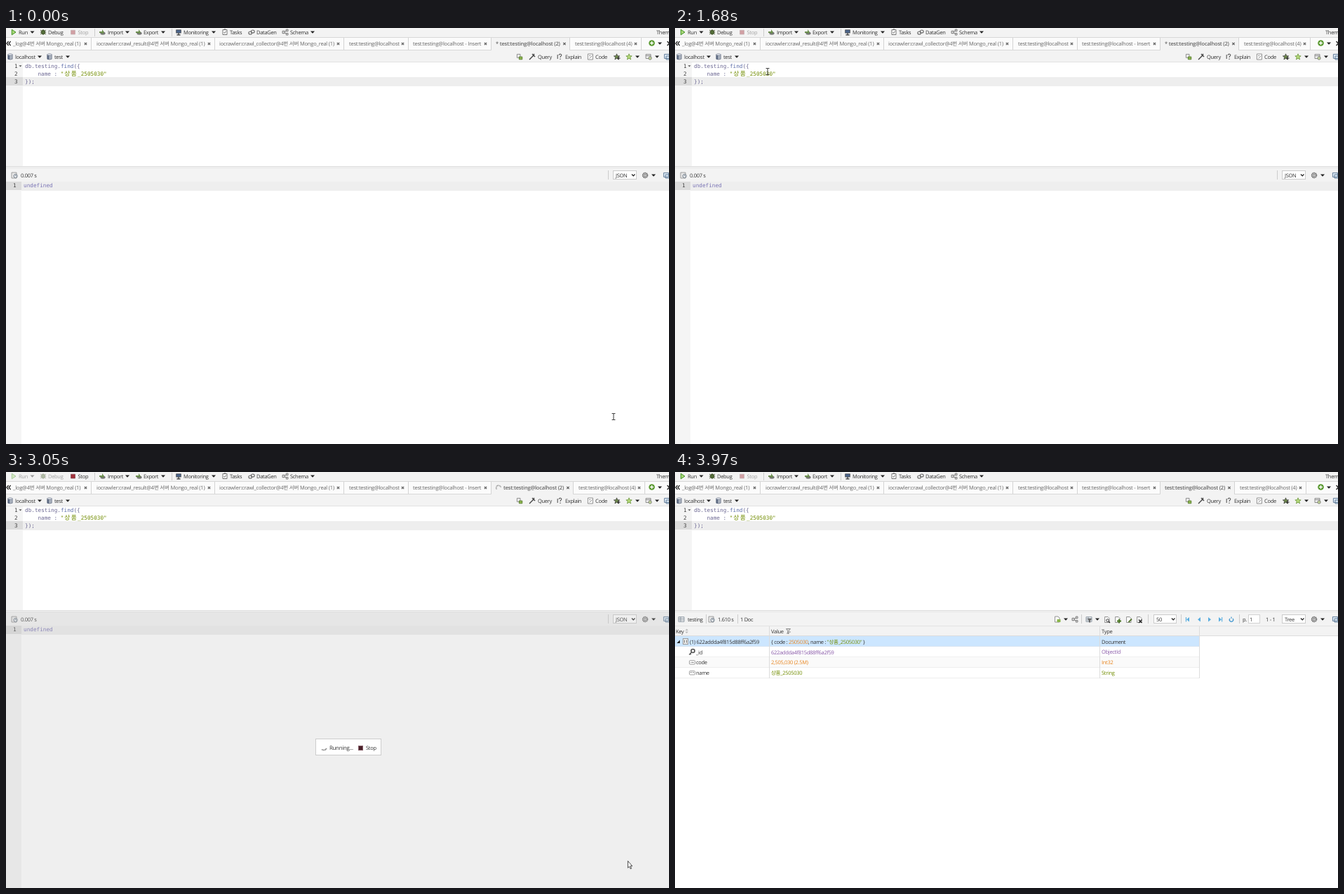
An HTML page that plays this animation: 945x593 px, repeating every 4760 ms.

```html
<!DOCTYPE html>
<html lang="ko">
<head>
<meta charset="utf-8">
<title>Query run</title>
<style>
html, body { margin: 0; width: 100%; height: 100%; overflow: hidden; background: #fff; }
svg { display: block; }
text {
  font: 7.5px "Open Sans", "Noto Sans CJK KR", "Noto Sans CJK", sans-serif;
  letter-spacing: -.3px;
  fill: #333;
  white-space: pre;
  text-rendering: geometricPrecision;
}
.tab { letter-spacing: -.24px; fill: #666; }
.long { letter-spacing: -.2px; fill: #666; }
.active { font-weight: 600; letter-spacing: -.2px; fill: #666; }
.big { font-size: 7.9px; }
.mono { font: 7.7px "DejaVu Sans Mono", monospace; letter-spacing: 0; fill: #6c6893; }
.num { fill: #444; }
.hangul { font: 8.7px "Noto Sans CJK KR", "Noto Sans CJK", sans-serif; letter-spacing: 1.4px; }
.str { fill: #718c00; }
.fn { fill: #5a6aa8; }
.val { fill: #7a74b5; }
.oid { fill: #8959a8; }
.int { fill: #e8851f; }
</style>
</head>
<body>
<svg id="stage" width="945" height="593">
  <defs>
    <path id="caret" d="M-3-1.6h6l-3 3.4z" fill="#222"/>
    <path id="close" d="M-1.7-1.7l3.4 3.4m0-3.4l-3.4 3.4" stroke="#555" stroke-width="1.1"/>
    <path id="play" d="M-2.7-3.8L3 0l-5.7 3.8z" fill="#a9d878" stroke="#3f8f22"/>
    <g id="bug" stroke="#3c4a25" fill="#55703a" stroke-width=".9">
      <path d="M-4-3l8 6m0-6l-8 6M-4.2 0h8.4"/><ellipse rx="2.4" ry="3.2"/>
    </g>
    <path id="halt" d="M-3-2.8h6v5.8h-6z" fill="#a3303a" stroke="#7d4a4f" stroke-width=".7"/>
    <g id="transfer">
      <ellipse cx="1" cy="1.6" rx="3.6" ry="2.2" fill="#777"/>
      <path d="M-4-1h4v-3l3 4-3 3V1h-4z" fill="#6b8f4e"/>
    </g>
    <g id="screen">
      <path d="M-3.4-3.3h6.8v4.4h-6.8z" fill="#4a638a" stroke="#555" stroke-width=".8"/><path d="M-2.6 3.8h5.2M0 1v3" stroke="#333" stroke-width="1.2"/>
    </g>
    <path id="board" d="M-3-3.5h6v7h-6zM-1-4.2h2M-1.4 0l1 1.4L1.8-1.6" fill="#fff" stroke="#555" stroke-width=".8"/>
    <g id="links" fill="#ddd" stroke="#666" stroke-width=".8">
      <path d="M-2 0L2.6-2.6M-2 0L2.6 2.6"/><path d="M-4-1.7h3.2v3.4H-4zM1.3-4H4v2.6H1.3zM1.3 1.4H4V4H1.3z"/>
    </g>
    <g id="chain" fill="none" stroke="#666" stroke-width="1.1">
      <ellipse cx="-1.8" cy="1" rx="2.4" ry="2"/><ellipse cx="1.8" cy="-1" rx="2.4" ry="2"/>
    </g>
    <g id="base">
      <path d="M-3.2-3.2v6.4q3.2 1.6 6.4 0v-6.4z" fill="#aab2be" stroke="#667083" stroke-width=".7"/>
      <path d="M-3.2-3v6.2q1.2.8 2.4.9V-2.4z" fill="#5d6a82"/>
      <ellipse cy="-3.1" rx="3.2" ry="1.2" fill="#e6eaf0" stroke="#667083" stroke-width=".6"/>
    </g>
    <g id="timer">
      <path d="M-4-4h7v8h-7z" fill="#e9e9e9" stroke="#888" stroke-width=".8"/><circle cx="1.6" cy="1" r="2.5" fill="#fff" stroke="#456" stroke-width=".8"/><path d="M1.6-.6V1H3" fill="none" stroke="#456" stroke-width=".7"/>
    </g>
    <g id="lock">
      <path d="M-3.6-3.6h4.6v5h-4.6z" fill="#eee" stroke="#777" stroke-width=".8"/><path d="M-.6 0h4.4v3.8H-.6z" fill="#8bb54c" stroke="#54762a" stroke-width=".8"/>
    </g>
    <path id="wand" d="M-4 4L2-2M0-4l4 4M3-4L1-1" stroke="#444" stroke-width="1.4"/>
    <path id="ask" d="M-1.8-2.2q.4-2 2.2-1.6t1.2 2.2Q0-.6 0 1M0 2.6v1.4M-3.8-3v6" fill="none" stroke="#555" stroke-width="1.1"/>
    <path id="code" d="M-3.6-4h7v8h-7zM-1.5 2.5l4-4M-2-1.6h2.4" fill="#fff" stroke="#777" stroke-width=".8"/>
    <path id="star" d="M0-4.2l1.2 2.9 3 .2-2.4 1.9.8 3.1L0 2.2l-2.6 1.7.8-3.1-2.4-1.9 3-.2z" stroke-width=".7"/>
    <g id="gear" fill="none" stroke="#666">
      <circle r="3.5" stroke-width="1.4" stroke-dasharray="1.7 .5"/><circle r="2" fill="#ccc" stroke-width=".8"/>
    </g>
    <path id="window" d="M-3.6-3.6h7v6h-7zM-1-1h6v5h-6z" fill="#dbe8f4" stroke="#5b7795" stroke-width=".9"/>
    <path id="sheet" d="M-4-3.4h8v6.8h-8zM-4-1.2h8M-4 1h8M-1-3.4v6.8" fill="#f8f8f8" stroke="#7a8794" stroke-width=".8"/>
    <path id="page" d="M-3.4-4h4.4l2 2v6h-6.4z" fill="#fff" stroke="#777" stroke-width=".8"/>
    <path id="ibeam" d="M-2.4-4.5h2q.4 0 .4.6.0-.6.4-.6h2M0-4.2v8.4M-2.4 4.5h2q.4 0 .4-.6 0 .6.4.6h2" fill="none" stroke="#222" stroke-width=".9"/>
    <path id="arrow" d="M.4.5v9.8l2.1-2 1.6 3.4 1.4-.6-1.5-3.4h2.7z" fill="#fff" stroke="#222" stroke-width=".8"/>
    <path id="hand" d="M-1 .9q1-1.4 2 0v4.3l3.4.9q1.2.3 1 1.7l-.8 4.3q-.3 1.6-1.6 1.6H0q-1 0-1.7-1.2L-4 8.6q.6-1.6 2 0l1 .8z" fill="#fff" stroke="#222" stroke-width=".9"/>
  </defs>
</svg>
<script>
const T = 4760;
const stage = document.getElementById('stage');

const use = (id, x, y, extra = '') => `<use href="#${id}" x="${x}" y="${y}" ${extra}/>`;
const text = (x, y, s, cls = '') => `<text x="${x}" y="${y}" class="${cls}">${s}</text>`;
const box = (x, y, w, h, fill, line) =>
  `<rect x="${x}" y="${y}" width="${w}" height="${h}" fill="${fill}" ${line ? `stroke="${line}"` : ''}/>`;
const vline = (x, y, h, fill = '#ccc') => box(x, y, 1, h, fill);
const group = (id, ...parts) => `<g id="${id}">${parts.join('')}</g>`;
const carets = (y, ...xs) => xs.map(x => use('caret', x, y)).join('');
const label = (y, icon, x, s, gap = 7) => use(icon, x, y) + text(x + gap, y + 2.8, s);
const select = (x, w, s) => box(x + .5, 203.5, w, 12, '#fff', '#ccc') + text(x + 4, 212.7, s) +
  `<path d="M${x + w - 6} 208.5l2.2 2.4 2.2-2.4" fill="none" stroke="#222" stroke-width="1.3"/>`;
const tab = (left, right, x, s, cls, on) =>
  box(left, 14, right - left, on ? 18 : 17, on ? '#f3f3f3' : '#fbfbfb') +
  vline(right, 14, 17, '#d4d4d4') + text(x, 24.9, s, cls) + use('close', right - (on ? 7 : 7.5), 22.5);

const query = 'test:testing@localhost';
const endTabs = (id, edge, x, s, extra = '') => group(id,
  tab(692, edge, x, s, 'active', true),
  tab(edge + 1, edge + 102, edge + 8, query + ' (4)', 'tab'), extra);
// An arc centred on its lowest point.
const spinner = (id, x, y, r, sweep, style) => {
  const a = Math.PI / 2 - sweep / 2, b = a + sweep;
  const at = k => `${r * Math.cos(k)} ${r * Math.sin(k)}`;
  return `<g transform="translate(${x} ${y})"><path id="${id}" d="M${at(a)}A${r} ${r} 0 ${sweep > Math.PI ? 1 : 0} 1 ${at(b)}"
    fill="none" ${style}/></g>`;
};
const resultTools = name => select(865, 33, name) + use('gear', 911, 210) + carets(210, 923) + use('window', 941, 210);

const frame = [
  box(0, 0, 945, 49, '#f3f3f3'), box(0, 13, 945, 1, '#d8d8d8'),
  box(0, 14, 945, 17, '#fbfbfb'), box(0, 31, 945, 1, '#d8d8d8'), box(0, 48, 945, 1, '#e2e2e2'),
  vline(126, 1, 11), vline(236, 1, 11),
  label(6, 'transfer', 137, 'Import', 8), label(6, 'transfer', 189, 'Export'),
  label(6, 'screen', 246, 'Monitoring'), label(6, 'board', 312, 'Tasks'),
  label(6, 'chain', 350, 'DataGen'), label(6, 'links', 398, 'Schema'),
  text(927, 8.8, 'Theme'), carets(6, 173, 224, 296, 437),
  tab(0, 121, 10, '_log@4번 서버 Mongo_real (1)', 'long'),
  tab(122, 297, 129, 'iocrawler:crawl_result@4번 서버 Mongo_real (1)', 'long'),
  tab(298, 481, 304, 'iocrawler:crawl_collector@4번 서버 Mongo_real (1)', 'long'),
  tab(482, 573, 489, query, 'tab'), tab(574, 691, 580, query + ' - Insert', 'long'),
  '<path d="M3.6 19l-2.6 3 2.6 3m3-6L4 22l2.6 3" fill="none" stroke="#222" stroke-width="1.2"/>',
  '<circle cx="920.5" cy="21.5" r="4.3" fill="#5b9a32"/><path d="M918 21.5h5M920.5 19v5" stroke="#fff" stroke-width="1.4"/>',
  carets(22, 932), '<path d="M942.5 19l3 3-3 3" fill="none" stroke="#222" stroke-width="1.4"/>',
  label(41, 'base', 6, 'localhost'), label(41, 'base', 62, 'test'),
  use('lock', 732, 41), label(41, 'wand', 750, 'Query', 8), label(41, 'ask', 790, 'Explain'),
  label(41, 'code', 833, 'Code'),
  use('star', 870.5, 41, 'fill="#6f8a4c" stroke="#333"'), '<path d="M871 43h4.6m-2.3-2.3v4.6" stroke="#333" stroke-width="1.1"/>',
  use('star', 888, 41, 'fill="#b5d97a" stroke="#5b8a2a"'),
  '<path d="M912 37.5h7v6h-7zM912 39.5h7" fill="#eee" stroke="#777" stroke-width=".8"/><circle cx="918" cy="43" r="2.2" fill="#c4d69a" stroke="#666" stroke-width=".7"/>',
  use('window', 942, 41), carets(41, 48, 88, 900, 928),
  box(0, 49, 945, 148, '#fff'), box(0, 49, 24, 148, '#f4f4f4'),
  box(24, 70, 921, 13, '#eee'), box(0, 70, 24, 12, '#dcdcdc'),
  [57, 67.6, 78.6].map((y, i) => text(12, y, i + 1, 'mono num')).join(''),
  '<path d="M18.5 53.3h4l-2 2.3z" fill="#555"/>',
  text(27, 57, 'db.testing.<tspan class="fn">find</tspan>({', 'mono'),
  text(45.4, 67.6, 'name : <tspan class="str">"</tspan>', 'mono'),
  text(83.3, 68, '상품', 'hangul str'), text(102, 67.6, '_2505030"', 'mono str'),
  text(27, 78.6, '});', 'mono'),
  box(0, 197, 945, 22, '#f3f3f3'), box(0, 197, 945, 1, '#dcdcdc'), box(0, 199, 945, 1, '#e8e8e8')
];

const idle = group('idle',
  box(0, 219, 945, 374, '#fff'), box(0, 219, 22, 374, '#f5f5f5'),
  box(22, 219, 923, 13, '#eee'), box(0, 219, 22, 12, '#dcdcdc'),
  text(10, 227.4, '1', 'mono num'), text(25, 227.4, 'undefined', 'mono val'),
  label(210, 'timer', 12, '0.007 s', 9), vline(858, 203, 13), resultTools('JSON'));

const busy = group('busy',
  box(0, 199, 945, 394, 'rgba(191,191,191,.25)'),
  box(441.5, 380.5, 93, 23, '#fff', '#ccc'),
  spinner('spin', 453, 392.5, 4, 2, 'stroke="#444" stroke-width="1.2" stroke-dasharray="1.5 .5"'),
  text(461, 395.7, 'Running...', 'big'), box(502.5, 390.5, 6, 6, '#4a2029', '#86606a'), text(513, 396.2, 'Stop'));

const row = (y, fill) => box(0, y, 747, 15, fill) + box(0, y + 14.5, 747, .7, '#e3e3e3');
const badge = (y, s) => `<rect x="20.5" y="${y - 2.7}" width="8" height="5.4" rx="1" fill="#fff" stroke="#888" stroke-width=".8"/>` +
  `<path d="${s}" transform="translate(24.5 ${y})" stroke="#555"/>`;
const types = [['Document', ''], ['ObjectId', 'oid'], ['Int32', 'int'], ['String', 'str']];
const navIcon = (x, dir, bar) => `<path d="M${x + 2 * dir} 207l${-4 * dir} 3.2 ${4 * dir} 3.2z" fill="#5aaee0"/>` +
  (bar ? box(x - 2.6 * dir - .5, 207, 1.1, 6.4, '#5aaee0') : '');
const id = '622addda4f815d88ff6a2f59';

const done = group('done',
  box(0, 219, 945, 374, '#fff'),
  group('wait', box(0, 294, 945, 299, '#f3f3f3')),
  box(0, 219, 945, 15, '#f3f3f3'), box(0, 219, 945, .7, '#ddd'), box(0, 233, 945, 1, '#dcdcdc'),
  row(234, '#cce6ff'), row(249, '#fff'), row(264, '#fafafa'), row(279, '#fff'),
  [134, 605, 747].map(x => vline(x, 220, 74, '#dcdcdc')).join(''),
  text(1, 229.6, 'Key'), '<path d="M14.5 226l2.2-2.5 2.2 2.5zm0 1.5l2.2 2.5 2.2-2.5z" fill="#bbb"/>',
  text(137, 229.6, 'Value'), '<path d="M158.5 223.5h6l-2.4 3v4l-1.4-1v-3zM159 230h3M163 228h2" fill="#ddd" stroke="#777" stroke-width=".8"/>',
  text(608, 229.6, 'Type'),
  '<path d="M7 239.5v4.4H2.6z" fill="#222"/>', box(11.5, 237.5, 7, 8, '#eee', '#999'),
  '<path d="M13.5 239.5v4M16.5 239.5v4" stroke="#777"/>',
  text(21, 244.6, `(1) ${id}`),
  '<circle cx="25.5" cy="255" r="2.5" fill="none" stroke="#555" stroke-width="1.6"/><path d="M23.6 257l-3.4 3.4m1.4-1.4l1.2 1.2" stroke="#555" stroke-width="1.4"/>',
  text(30, 259.6, '_id'), badge(271.4, 'M-2 0h1m1 0h2'), text(30, 274.4, 'code'),
  badge(286.3, 'M-2.5-.6h1.6m1.6 0h1.6'), text(30, 289.2, 'name'),
  text(137, 244.6, '{ code : <tspan class="int">2505030</tspan>, name : <tspan class="str">"상품_2505030"</tspan> }'),
  text(137, 259.6, id, 'oid'), text(137, 274.4, '2,505,030 (2.5M)', 'int'), text(137, 289.2, '상품_2505030', 'str'),
  types.map(([s, cls], i) => text(608, 244.6 + i * 14.87, s, cls)).join(''),
  label(210, 'sheet', 9, 'testing', 9), vline(44, 203, 13), label(210, 'timer', 52, '1.610 s', 9),
  vline(89, 203, 13), text(93, 212.7, '1 Doc'),
  use('page', 545, 210), box(544.5, 210, 5, 4, '#8bb54c'), use('links', 570, 210), vline(579, 203, 13),
  use('sheet', 590, 210), '<path d="M588 209h6l-2 2.4v3h-2v-3z" fill="#666"/>', carets(210, 557, 602),
  [616, 631, 647, 662].map(x => use('page', x, 210.5)).join(''),
  '<circle cx="616.5" cy="211.5" r="1.8" fill="#fff" stroke="#333"/><path d="M618 213l2 2" stroke="#333" stroke-width="1.3"/>',
  '<path d="M630 212.5h6m-3-3v6" stroke="#47751f" stroke-width="1.8"/><path d="M646.5 214l4.5-4.5" stroke="#55762f" stroke-width="1.8"/>',
  '<path d="M661 210.5l4.5 4.5m0-4.5l-4.5 4.5" stroke="#222" stroke-width="1.4"/>',
  vline(674, 203, 13), select(682, 32, '50'), vline(721, 203, 13),
  navIcon(731, 1, true), navIcon(747, 1), navIcon(762, -1), navIcon(777, -1, true),
  '<path d="M791 208.8a2.7 2.7 0 1 0 4 0m-2-2.4v2.4" fill="none" stroke="#3f95cf" stroke-width="1.2"/>',
  vline(804, 203, 13), text(809, 212.7, 'p.'), box(817.5, 203.5, 16, 12, '#fff', '#d2d2d2'),
  text(819, 212.7, '1'), text(842, 212.7, '1 - 1'), resultTools('Tree'));

stage.innerHTML += [
  ...frame,
  group('hover', box(3.5, -1, 39, 13.5, '#eef5fc', '#8592ad'), vline(33, 0, 12, '#8592ad')),
  group('run', use('play', 11, 6), text(18, 8.8, 'Run'), carets(6, 37.5), label(6, 'bug', 53, 'Debug')),
  group('stop', label(6, 'halt', 95.5, 'Stop')),
  endTabs('tabIdle', 803, 698, `* ${query} (2)`),
  endTabs('tabBusy', 808, 709, `${query} (2)`, spinner('tabSpin', 702, 22.5, 3.4, 3.6, 'stroke="#777"')),
  endTabs('tabDone', 797, 698, `${query} (2)`),
  idle, busy, done,
  '<circle id="click" cx="25" cy="5" r="9" fill="#f4ee3c" style="mix-blend-mode:multiply"/>',
  group('cursor', group('beam', use('ibeam', 0, 0)), group('point', use('arrow', 0, 0)), group('finger', use('hand', 0, 0)))
].join('');

// Keyframes are [time in ms, properties, easing to the next one].
const play = (id, frames) => document.getElementById(id).animate(
  frames.map(([t, props, easing = 'step-end']) => ({ offset: t / T, ...props, easing })),
  { duration: T, iterations: Infinity });
const fade = (id, ...keys) => play(id, [...keys, [T, keys.at(-1)[1]]].map(([t, opacity]) => [t, { opacity }]));
const show = (id, from, to) => fade(id, [0, 0], [from, 1], [to, 0]);

const START = 1740, LOCKED = 2010, RESULT = 3410, READY = 3760;
fade('run', [0, 1], [LOCKED, .42], [READY, 1]);
fade('stop', [0, .42], [LOCKED, 1], [READY, .42]);
show('hover', 470, 1680);
show('click', 1480, 1610);
fade('tabIdle', [0, 1], [START, 0]);
show('tabBusy', START, RESULT);
fade('tabDone', [0, 0], [RESULT, 1]);
fade('idle', [0, 1], [RESULT, 0]);
show('busy', START, RESULT);
fade('done', [0, 0], [RESULT, 1]);
show('wait', RESULT, READY);

// One turn takes `period`; the arc points down at `zero`.
const spin = (id, period, zero) => {
  const turn = t => ({ transform: `rotate(${(t - zero) / period * 360}deg)` });
  play(id, [[0, turn(0), 'steps(68)'], [T, turn(T)]]);
};
spin('spin', 1240, 1810);
spin('tabSpin', 2000, 2160);

fade('beam', [0, 1], [270, 0], [1680, 1], [1940, 0]);
fade('point', [0, 0], [1610, 1], [1680, 0], [1940, 1], [3970, 0]);
show('finger', 470, 1610);
const path = [
  [0, 866, 554, 4], [270, 9, 75], [470, 33, -4, 2], [610, 31, 0], [880, 28, 2], [950, 25, 4],
  [1550, 25, 4, 4], [1810, 239, 120, 2], [1940, 410, 233, 4], [2220, 680, 413, 4],
  [2490, 810, 501, 8], [3050, 886, 554, 7], [3550, 888, 557], [3620, 889, 559, 5], [3970, 925, 600], [T, 925, 600]
];
play('cursor', path.map(([t, x, y, n]) =>
  [t, { transform: `translate(${x}px, ${y}px)` }, n ? `steps(${n})` : 'step-end']));
</script>
</body>
</html>
```
